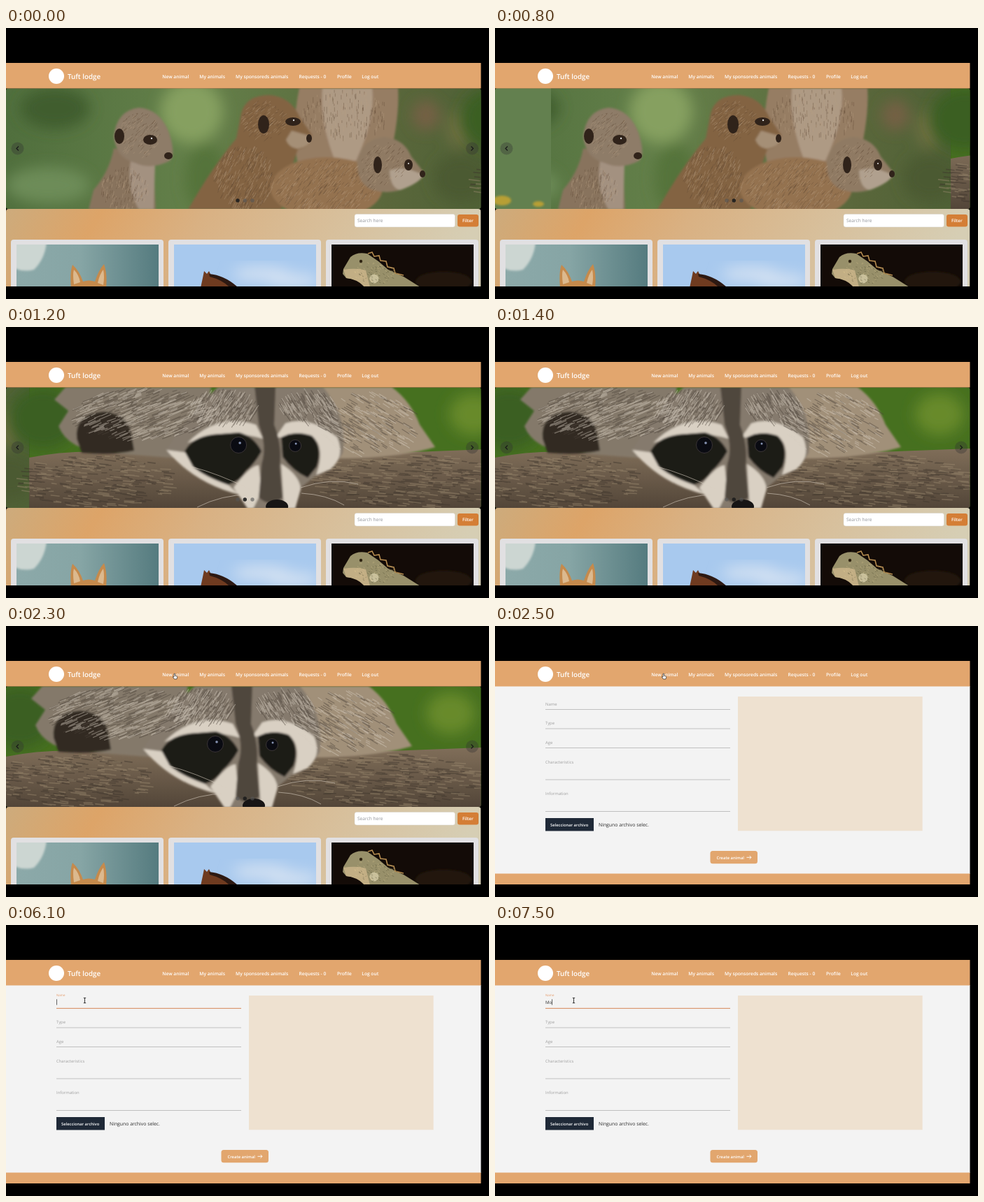
An HTML page that plays this animation: 690 px wide and 388 px high, repeating every 8 s.

```html
<!DOCTYPE html>
<html lang="en">
<head>
<meta charset="utf-8">
<title>Animal adoption page</title>
<style>
  html, body { margin: 0; width: 100%; height: 100%; overflow: hidden; background: #000; }
  svg { display: block; width: 690px; height: 388px; }
  text { font-family: "Open Sans", "Noto Sans", sans-serif; text-rendering: geometricPrecision; white-space: pre; }
  .nav text { font-size: 6.65px; font-weight: 600; fill: #fff; }
  .nav .brand { font-size: 9.8px; }
  .label { font-size: 5.9px; fill: #a0a0a0; }
  .line { stroke: #b4b4b4; stroke-width: .8; }
  .button { font-weight: 600; fill: #fff; }
</style>
</head>
<body>
<svg viewBox="0 0 690 388">
  <defs>
    <clipPath id="carouselClip"><rect y="86.5" width="678.5" height="172.5" rx="3"/></clipPath>
    <clipPath id="pageClip"><rect y="50" width="678.5" height="320"/></clipPath>
    <clipPath id="catClip"><rect x="15" y="310" width="203" height="60"/></clipPath>
    <clipPath id="horseClip"><rect x="240" y="310" width="203" height="60"/></clipPath>
    <clipPath id="lizardClip"><rect x="465" y="310" width="203" height="60"/></clipPath>
    <filter id="blur" x="-30%" y="-30%" width="160%" height="160%"><feGaussianBlur stdDeviation="10"/></filter>
    <filter id="soft" x="-20%" y="-20%" width="140%" height="140%"><feGaussianBlur stdDeviation="1.6"/></filter>
    <linearGradient id="panel" x2="1" y2=".1">
      <stop offset="0" stop-color="#cdab7c"/><stop offset=".2" stop-color="#dda468"/>
      <stop offset=".42" stop-color="#d9b183"/><stop offset="1" stop-color="#d6ceb4"/>
    </linearGradient>
    <linearGradient id="teal"><stop offset="0" stop-color="#8ca9a9"/><stop offset=".45" stop-color="#86a5a5"/><stop offset="1" stop-color="#557b7f"/></linearGradient>
    <linearGradient id="meadow"><stop offset="0" stop-color="#506f3d"/><stop offset=".4" stop-color="#64804a"/><stop offset=".8" stop-color="#5a673b"/><stop offset="1" stop-color="#4f6136"/></linearGradient>
    <linearGradient id="log" x2="0" y2="1"><stop offset="0" stop-color="#806e59"/><stop offset="1" stop-color="#524538"/></linearGradient>
  </defs>

  <g clip-path="url(#pageClip)">
    <g id="home">
      <g clip-path="url(#carouselClip)">
        <g id="meerkats">
          <rect y="86" width="679" height="174" fill="url(#meadow)"/>
          <g filter="url(#blur)">
            <ellipse cx="70" cy="115" rx="50" ry="30" fill="#3f5d2f"/>
            <ellipse cx="265" cy="120" rx="45" ry="45" fill="#86a061"/>
            <ellipse cx="60" cy="225" rx="60" ry="26" fill="#6d8c58"/>
            <ellipse cx="285" cy="215" rx="30" ry="50" fill="#54733a"/>
            <ellipse cx="600" cy="125" rx="20" ry="22" fill="#756045"/>
            <ellipse cx="648" cy="145" rx="18" ry="26" fill="#6f6f42"/>
            <ellipse cx="650" cy="215" rx="40" ry="35" fill="#4b5a30"/>
          </g>
          <g filter="url(#soft)">
            <path d="M419 86Q406 150 418 200L545 200Q563 130 560 86Z" fill="#967d64"/>
            <path d="M452 86Q448 135 470 190L500 190Q528 130 523 86Z" fill="#ae9a84"/>
            <path d="M154 172Q148 205 125 232L118 260L214 260Q211 215 213 190Z" fill="#88735d"/>
            <path d="M178 190Q172 230 190 260L211 260L213 190Z" fill="#a39180"/>
            <path d="M154 155Q158 118 190 114Q220 116 233 150Q243 181 234 190Q208 204 184 193Q157 186 154 155Z" fill="#8e7b68"/>
            <path d="M336 122Q343 96 376 96Q407 98 420 128L437 153Q438 170 417 174Q404 208 393 260L260 260Q294 200 329 158Z" fill="#836342"/>
            <path d="M408 147L436 155Q437 170 416 173Q404 171 400 160Z" fill="#a58f76"/>
            <ellipse cx="458" cy="229" rx="80" ry="44" fill="#947250"/>
            <path d="M502 188Q511 157 541 156Q569 159 579 184L598 208Q595 218 576 226Q552 240 524 232Q499 222 502 188Z" fill="#8f7a64"/>
            <path d="M548 204Q570 196 596 211Q589 223 563 232Q549 229 548 204Z" fill="#b0a08e"/>
          </g>
          <g id="meerkatFur"></g>
          <g fill="#30231a">
            <ellipse cx="162" cy="155" rx="7" ry="11"/><ellipse cx="206" cy="160" rx="10" ry="7"/><ellipse cx="232" cy="183" rx="6" ry="5"/>
            <ellipse cx="368" cy="138" rx="8" ry="13"/><ellipse cx="410" cy="134" rx="11" ry="6"/><ellipse cx="433" cy="158" rx="4" ry="6"/>
            <ellipse cx="531" cy="196" rx="6" ry="12"/><ellipse cx="575" cy="196" rx="6" ry="8"/><ellipse cx="595" cy="209" rx="4" ry="5"/>
          </g>
          <g fill="#ddd"><circle cx="208" cy="158" r="1.2"/><circle cx="411" cy="132" r="1.2"/><circle cx="575" cy="194" r="1.1"/></g>
        </g>

        <g id="raccoon">
          <rect y="86" width="679" height="174" fill="#46701f"/>
          <g filter="url(#blur)">
            <ellipse cx="20" cy="130" rx="50" ry="45" fill="#3a5f20"/>
            <ellipse cx="635" cy="125" rx="35" ry="30" fill="#688a2b"/>
          </g>
          <path d="M0 187Q60 175 130 180L420 184L679 174V260H0Z" fill="url(#log)"/>
          <g id="bark"></g>
          <g filter="url(#soft)">
            <path d="M52 86L36 104L56 120L42 142Q55 176 110 180L240 190L260 86Z" fill="#84796a"/>
            <path d="M400 86H518Q545 106 558 140L580 172Q520 190 420 188Z" fill="#a19079"/>
            <path d="M68 160Q64 124 107 121Q142 125 146 154L150 177Q120 184 75 180Z" fill="#332a23"/>
            <path d="M196 176Q240 110 270 86H420Q456 130 448 180Q436 204 408 214L386 232L378 260H312L298 238Q230 216 196 176Z" fill="#857a6d"/>
            <g fill="#d9d0c3">
              <path d="M226 166Q270 122 324 140L334 160Q300 150 262 154Z"/>
              <path d="M352 158L366 138Q400 126 440 158Q452 186 430 204L410 212Q424 172 404 156Q380 148 360 158Z"/>
              <path d="M196 176L226 180Q236 202 284 226L300 240Q236 224 196 176Z"/>
              <path d="M292 230Q316 198 328 198L332 236L320 260H312Z"/>
              <path d="M360 196Q386 212 388 232L380 260H364Z"/>
            </g>
            <g fill="#1f1a18">
              <path d="M222 178Q232 158 262 154L300 151Q322 157 332 178Q322 196 310 206Q300 222 284 226Q250 214 234 200Z"/>
              <path d="M360 158Q380 147 404 156Q420 172 411 200L398 216Q376 206 362 186Z"/>
            </g>
            <path d="M322 86H352L350 140Q362 170 358 200L362 244Q345 260 328 244L332 196Q340 170 328 140Z" fill="#50463c"/>
          </g>
          <g id="raccoonFur"></g>
          <ellipse cx="354" cy="257" rx="16" ry="10" fill="#171515"/>
          <g fill="#0a0b12" stroke="#453d3e" stroke-width=".8"><circle cx="299" cy="169" r="11.5"/><circle cx="380" cy="170" r="8.5"/></g>
          <g fill="#8794b4"><circle cx="301" cy="166" r="1.8"/><circle cx="381" cy="167" r="1.5"/></g>
          <path d="M315 232Q270 210 232 200M315 240Q275 240 240 258M388 230Q430 215 470 225M389 238Q425 240 450 255" fill="none" stroke="#d8cfc2" stroke-width=".6"/>
        </g>

        <g id="edge">
          <rect y="86" width="80" height="174" fill="#63804f"/>
          <g filter="url(#soft)" fill="#b79f35"><ellipse cx="10" cy="247" rx="13" ry="7"/><ellipse cx="62" cy="252" rx="8" ry="4"/></g>
        </g>
        <g id="dots"><circle cx="331" cy="247" r="2.7"/><circle cx="341.3" cy="247" r="2.7"/><circle cx="352" cy="247" r="2.7"/></g>
        <g fill="none" stroke="#191919" stroke-width="1.2">
          <circle cx="16.5" cy="172.5" r="9" fill="#333" fill-opacity=".35" stroke="none"/><path d="M18 169.5L15 172.5L18 175.5"/>
          <g id="next"><circle cx="666" cy="172.5" r="9" fill="#333" fill-opacity=".35" stroke="none"/><path d="M664.5 169.5L667.5 172.5L664.5 175.5"/></g>
        </g>
      </g>

      <rect y="259" width="678.5" height="120" rx="4" fill="url(#panel)"/>
      <rect x="498" y="266.5" width="143.5" height="18.5" rx="3" fill="#fff" stroke="#d6d2cb" stroke-width=".5"/>
      <text x="502" y="278.3" font-size="6.6" fill="#92959a">Search here</text>
      <rect x="645" y="267" width="30" height="17.5" rx="3" fill="#d47e36"/>
      <text class="button" x="652" y="278.2" font-size="6.3">Filter</text>
      <g fill="#e1e0e2">
        <rect x="7" y="303" width="218" height="80" rx="4"/><rect x="232" y="303" width="218" height="80" rx="4"/><rect x="457" y="303" width="218" height="80" rx="4"/>
      </g>
      <g clip-path="url(#catClip)">
        <rect x="15" y="310" width="203" height="60" fill="url(#teal)"/>
        <path d="M12 306H58Q56 330 40 346Q26 350 12 344Z" fill="#ccd6d2" filter="url(#soft)"/>
        <path d="M93 372Q91 350 95 339Q105 348 110 363Q118 360 127 363Q132 347 140 338Q145 352 143 372Z" fill="#c58a4c"/>
        <path d="M97 367Q95 352 97 346Q104 353 106 364ZM131 365Q134 352 139 346Q141 356 139 368Z" fill="#dcb98e"/>
      </g>
      <g clip-path="url(#horseClip)">
        <rect x="240" y="310" width="203" height="60" fill="#a8c9ee"/>
        <g filter="url(#blur)" fill="#d3e1f2">
          <ellipse cx="365" cy="352" rx="42" ry="10"/><ellipse cx="410" cy="362" rx="38" ry="10"/>
        </g>
        <path d="M278 372L281 358L283 348L287 352L290 348L293 354Q315 358 332 372Z" fill="#6f3b20"/>
        <path d="M290 352Q313 354 332 372H320Q310 361 291 356Z" fill="#2d1912"/>
      </g>
      <g clip-path="url(#lizardClip)">
        <rect x="465" y="310" width="203" height="60" fill="#130b07"/>
        <ellipse cx="625" cy="363" rx="40" ry="14" fill="#24140b" filter="url(#soft)"/>
        <path d="M482 345L492 328Q501 320 516 323L532 334L546 346L568 356L592 371H516Q505 360 486 358L481 352Z" fill="#98906a"/>
        <path d="M482 346Q500 343 514 347L520 371H512Q503 360 486 358Z" fill="#c2ae84"/>
        <circle cx="526" cy="359" r="6.5" fill="#c9c09b"/><circle cx="507" cy="334" r="2.2" fill="#2f2412"/>
        <path d="M517 323L523 321L526 327L533 326L535 333L543 334L545 342L554 344L556 351L568 354" fill="none" stroke="#b58c50" stroke-width="1.6"/>
        <g id="scales"></g>
      </g>
    </g>

    <g id="form">
      <rect y="86" width="679" height="269" fill="#f3f3f3"/>
      <rect x="347" y="101" width="263.7" height="192.3" fill="#eee1d0"/>
      <path class="line" d="M72 119.5H336M72 147H336M72 174.5H336M72 220H336M72 265.5H336"/>
      <path id="focusLine" d="M72 119.3H336" stroke="#e0905f" stroke-width="1"/>
      <text class="label" id="nameLabel">Name</text>
      <text class="label" x="72" y="141.2">Type</text>
      <text class="label" x="72" y="168.8">Age</text>
      <text class="label" x="72" y="196.5">Characteristics</text>
      <text class="label" x="72" y="242">Information</text>
      <text id="typed" x="72" y="112.9" font-size="6.2" fill="#333"></text>
      <rect id="caret" y="106.3" width=".7" height="8.2" fill="#222"/>
      <rect x="72" y="275" width="69" height="18.5" fill="#1f2937"/>
      <text class="button" x="79" y="286.8" font-size="5.84">Seleccionar archivo</text>
      <text x="148" y="287" font-size="6.85" fill="#2c2c2c">Ninguno archivo selec.</text>
      <rect x="307.5" y="322" width="67.5" height="18.3" rx="3.5" fill="#e2a66e"/>
      <text class="button" x="316.5" y="333.6" font-size="5.86">Create animal</text>
      <path d="M359.5 331.3H366M363.6 328.9L366 331.3L363.6 333.7" fill="none" stroke="#fff" stroke-width=".9"/>
      <rect y="354.5" width="679" height="16" fill="#e2a66e"/>
    </g>

    <g class="nav">
      <rect y="50" width="679" height="36.5" fill="#e2a66e"/>
      <circle cx="72" cy="69" r="11" fill="#fff"/>
      <text class="brand" x="88" y="72.8">Tuft lodge</text>
      <text x="223.3" y="71.5">New animal</text>
      <text x="276.3" y="71.5">My animals</text>
      <text x="328" y="71.5">My sponsoreds animals</text>
      <text x="418.5" y="71.5">Requests - 0</text>
      <text x="473" y="71.5">Profile</text>
      <text x="508.3" y="71.5">Log out</text>
    </g>

    <g id="pointer">
      <path id="arrow" d="M0 -3V5L1.8 3.4L3 6L4.2 5.4L3.1 3H5.4Z" fill="#fff" stroke="#111" stroke-width=".6"/>
      <path id="hand" d="M-1 -3.5Q0 -4.3 .7 -3.5V-.6L3.2 0Q3.8 .3 3.6 1.5L2.9 4H-.5L-2.8 .9Q-2.5 0 -1 1Z" fill="#fff" stroke="#222" stroke-width=".7"/>
      <path id="beam" d="M-1.7 -3.6H1.7M0 -3.6V3.6M-1.7 3.6H1.7" fill="none" stroke="#222" stroke-width=".9"/>
    </g>
  </g>
</svg>
<script>
const el = id => document.getElementById(id);
const show = (id, on) => el(id).setAttribute('display', on ? 'inline' : 'none');
const move = (id, x, y, extra = '') => el(id).setAttribute('transform', `translate(${x} ${y})${extra}`);
const mix = (a, b, k) => a + (b - a) * k;
const between = (t, start, end) => t >= start && t < end;
const progress = (t, start, length) => Math.min(1, Math.max(0, (t - start) / length));

let seed = 7;
const random = () => (seed = seed * 16807 % 2147483647) / 2147483647;

// Short strokes scattered inside an ellipse.
function strokes(id, color, cx, cy, rx, ry, dx, dy, count, width = .8) {
  let d = '';
  for (let i = 0; i < count; i++) {
    const angle = random() * 2 * Math.PI, r = Math.sqrt(random()), k = .5 + random();
    const x = cx + rx * r * Math.cos(angle), y = cy + ry * r * Math.sin(angle);
    d += `M${x.toFixed(1)} ${y.toFixed(1)}l${(dx * k).toFixed(1)} ${(dy * k + random() * 2 - 1).toFixed(1)}`;
  }
  const path = document.createElementNS('http://www.w3.org/2000/svg', 'path');
  path.setAttribute('d', d);
  path.setAttribute('style', `fill:none;stroke:${color};stroke-width:${width};opacity:.45`);
  el(id).append(path);
}

for (const color of ['#5c4733', '#b9a184']) {
  strokes('meerkatFur', color, 192, 152, 30, 32, -3, 3, 90);
  strokes('meerkatFur', color, 170, 228, 34, 30, -1, 5, 90);
  strokes('meerkatFur', color, 372, 130, 32, 28, -4, 3, 90);
  strokes('meerkatFur', color, 342, 212, 42, 46, -3, 6, 190);
  strokes('meerkatFur', color, 485, 122, 62, 36, 0, 6, 130);
  strokes('meerkatFur', color, 458, 225, 72, 38, -4, 5, 230);
  strokes('meerkatFur', color, 542, 192, 32, 30, -3, 3, 80);
}
for (const color of ['#3d342a', '#9c8970']) {
  strokes('bark', color, 90, 220, 110, 38, 11, 1, 150, 1.6);
  strokes('bark', color, 540, 220, 140, 38, 13, 1, 170, 1.6);
}
for (const color of ['#4a4138', '#d6cdbf']) {
  strokes('raccoonFur', color, 170, 122, 100, 36, -12, 5, 260, 1.2);
  strokes('raccoonFur', color, 480, 136, 70, 44, 10, 6, 130, 1.2);
  strokes('raccoonFur', color, 280, 112, 48, 24, -5, 8, 130, 1.2);
  strokes('raccoonFur', color, 396, 112, 40, 24, 5, 8, 90, 1.2);
}
strokes('scales', '#dcc590', 525, 350, 30, 16, 2, 1, 60, .9);
strokes('scales', '#4e4a30', 530, 352, 28, 14, 2, 1, 50, .9);

function bezier(x1, y1, x2, y2, x) {
  const at = (a, b, s) => 3 * a * s * (1 - s) ** 2 + 3 * b * s * s * (1 - s) + s ** 3;
  let low = 0, high = 1;
  for (let i = 0; i < 24; i++) {
    const s = (low + high) / 2;
    if (at(x1, x2, s) < x) low = s; else high = s;
  }
  return at(y1, y2, low);
}

const slideStart = 766;
const labelStart = 4880;

function drawHome(t) {
  const slide = bezier(.25, .1, .25, 1, progress(t, slideStart, 600));
  move('meerkats', -679 * slide, 0);
  move('raccoon', 679 * (1 - slide), 0);
  const starting = between(t, slideStart, 900);
  show('edge', starting);
  show('next', !starting);
  const active = t < slideStart ? 0 : 1;
  [...el('dots').children].forEach((dot, i) => {
    dot.setAttribute('fill', i === active ? '#1d1d1d' : '#555');
    dot.setAttribute('opacity', i === active ? .9 : .6);
  });
}

function drawForm(t) {
  const k = bezier(.4, 0, .2, 1, progress(t, labelStart, 300));
  const color = [[160, 228], [160, 152], [160, 102]].map(([a, b]) => mix(a, b, k));
  move('nameLabel', 72, mix(113.5, 102, k), ` scale(${mix(1, .75, k)})`);
  el('nameLabel').style.fill = `rgb(${color})`;
  show('focusLine', t >= labelStart);
  el('typed').textContent = t < 6700 ? '' : t < 7500 ? 'M' : 'Mo';
  el('caret').setAttribute('x', 72 + (t < 6700 ? 0 : el('typed').getComputedTextLength()));
  show('caret', between(t, 4980, 5500) || between(t, 6000, 6600) || between(t, 6700, 7300) || t >= 7500);
}

function drawPointer(t) {
  const ease = u => u * u * (3 - 2 * u);
  const toMenu = ease(progress(t, 1850, 450)), toField = ease(progress(t, 2950, 600));
  const x = mix(mix(395, 241, toMenu), 112.5, toField);
  const y = mix(mix(250, 72, toMenu), 108, toField);
  const overField = y > 100 && t > 2950, overMenu = y < 77;
  move('pointer', x, y);
  show('pointer', t >= 1900);
  show('beam', overField);
  show('hand', overMenu);
  show('arrow', !overField && !overMenu);
}

function frame() {
  const t = performance.now() % 8000;
  const onForm = t >= 2500;
  show('home', !onForm);
  show('form', onForm);
  if (onForm) drawForm(t); else drawHome(t);
  drawPointer(t);
  requestAnimationFrame(frame);
}
frame();
</script>
</body>
</html>
```
